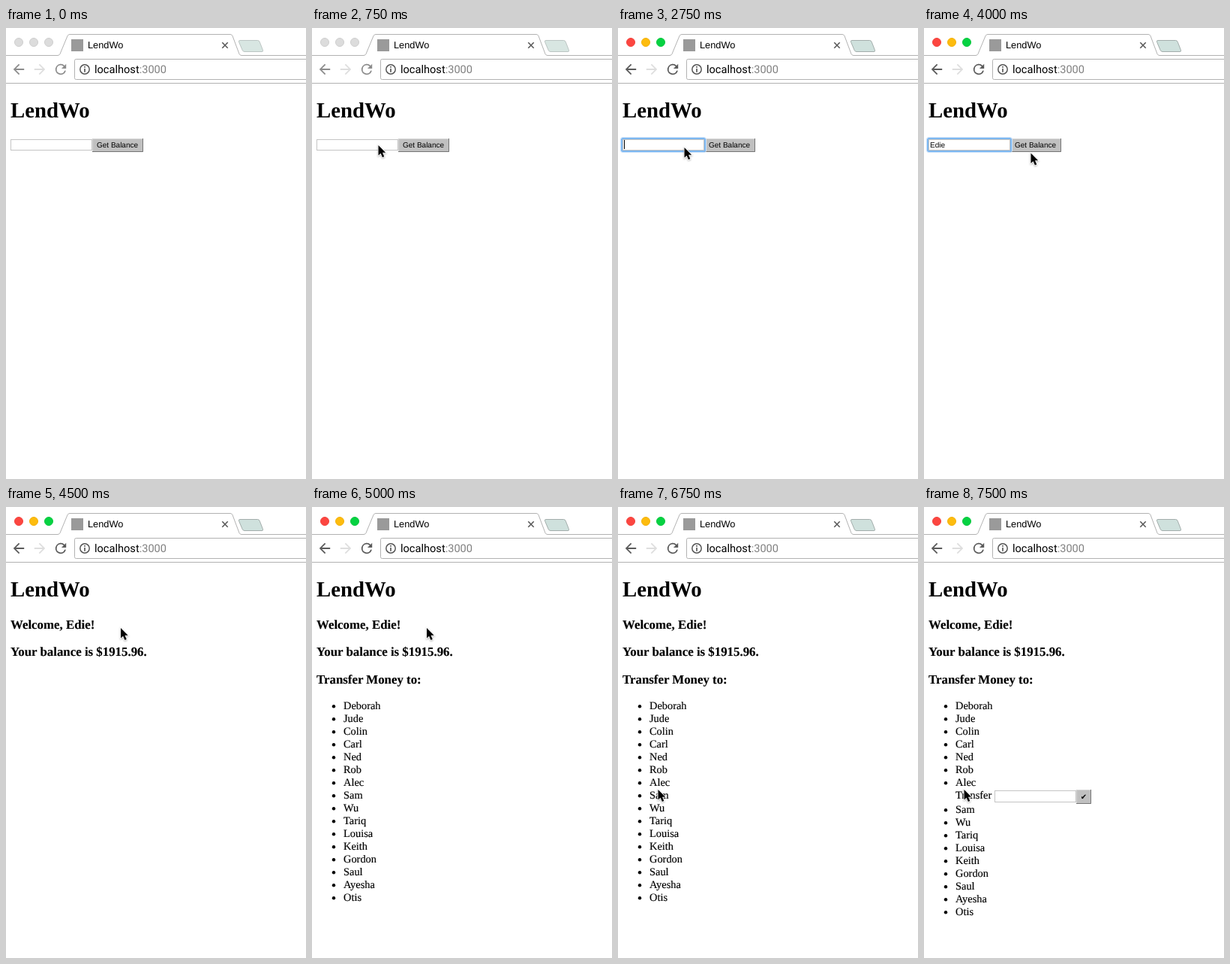
Write an HTML page that moves like this. It is 400 px wide and 600 px high and loops after 8 s.

```html
<!DOCTYPE html>
<html lang="en">
<head>
<meta charset="utf-8">
<title>LendWo</title>
<style>
  html, body { margin: 0; width: 100%; height: 100%; overflow: hidden; background: #fff; }
  svg { display: block; width: 400px; height: 600px; }
  text { white-space: pre; text-rendering: geometricPrecision; }
  .serif { font: 14.4px "Liberation Serif", serif; }
  .h1 { font: bold 28.8px "Liberation Serif", serif; }
  .h3 { font: bold 16.85px "Liberation Serif", serif; }
  .serif, .h3 { stroke: #000; stroke-width: .15px; }
  .control { font: 10px "Liberation Sans", sans-serif; }
  .tab { font: 12.8px "Liberation Sans", sans-serif; }
  .url { font: 14.6px Roboto, sans-serif; }
  .line { fill: none; stroke: #b2b2b2; }
  .icon { fill: #5a5a5a; }
  .close { fill: none; stroke: #5a5a5a; stroke-width: 1.6; }
  #newTab { fill: #cfe1dd; stroke: #a3adab; }
  .blurred .icon { fill: #8c8c8c; }
  .blurred .light { fill: #dcdcdc; stroke: #cecece; }
  .blurred #newTab { fill: #d8e6e2; stroke: #bcc5c3; }
</style>
</head>
<body>
<svg viewBox="0 0 400 600">
  <defs>
    <path id="arrow" transform="scale(.9)" d="M8 -1H-4.200L1.400 -6.600L0 -8L-8 0L0 8L1.400 6.600L-4.200 1H8Z"/>
    <path id="reload" transform="scale(.9)" d="M5.650 -5.650A8 8 0 1 0 7.730 2H5.650A6 6 0 1 1 0 -6C1.660 -6 3.140 -5.310 4.220 -4.220L1 -1H8V-8Z"/>
  </defs>
  <rect width="400" height="600" fill="#fff"/>

  <g id="chrome">
    <circle class="light" cx="17" cy="19" r="5.5" fill="#fc4640" stroke="#f2423d"/>
    <circle class="light" cx="37" cy="19" r="5.5" fill="#fdbc0e" stroke="#f4b10c"/>
    <circle class="light" cx="57" cy="19" r="5.5" fill="#06d242" stroke="#07c83e"/>
    <path class="line" d="M0 36.5H69Q71 36.5 72 34.5L82 10.5Q83 8.5 85 8.5H299Q301 8.5 302 10.5L311 34.5Q312 36.5 314 36.5H400"/>
    <path class="line" d="M0 73.5H400"/>
    <path class="line" d="M400 41.5H93.500Q91.500 41.5 91.500 43.5V66.500Q91.500 68.500 93.500 68.500H400"/>
    <path id="newTab" d="M312 16.500H335.500Q337.500 16.500 338.200 18.500L342.500 29.500Q343.300 31.500 341 31.500H318Q316 31.500 315.200 29.500L310.500 18.500Q309.800 16.500 312 16.500Z"/>
    <rect x="87" y="15" width="16" height="16" fill="#9a9a9a"/>
    <text class="tab" x="109" y="27">LendWo</text>
    <path class="close" d="M288.300 19.300L295.700 26.700M295.700 19.300L288.300 26.700"/>
    <use class="icon" href="#arrow" x="17" y="55"/>
    <use href="#arrow" transform="translate(45 55) scale(-1 1)" fill="#dedede"/>
    <use class="icon" href="#reload" x="73" y="55"/>
    <circle cx="105" cy="55" r="6.200" fill="none" stroke="#555" stroke-width="1.500"/>
    <path d="M105 51V52.700M105 54V58.700" stroke="#555" stroke-width="1.700"/>
    <text class="url" x="118" y="60">localhost<tspan fill="#808080">:3000</tspan></text>
  </g>

  <text class="h1" x="6" y="119">LendWo</text>

  <g id="login">
    <rect x="6.500" y="148.500" width="108" height="14" fill="#fff" stroke="#c4c4c4"/>
    <rect x="115" y="147" width="68" height="18" fill="#c0c0c0"/>
    <path d="M115.500 165V147.500H183" fill="none" stroke="#d6d6d6"/>
    <path d="M115 164.500H182.500V147" fill="none" stroke="#757575"/>
    <text class="control" x="121" y="159">Get Balance</text>
    <g id="ring" fill="none">
      <rect x="3.500" y="145.500" width="114" height="20" rx="2.500" stroke="#cfe4fa"/>
      <rect x="5" y="147" width="111" height="17" rx="1.500" stroke="#7db7f0" stroke-width="2"/>
    </g>
    <text class="control" id="entry" x="8" y="159"></text>
    <rect id="caret" y="149" width="1" height="12"/>
  </g>

  <g id="account" class="h3">
    <text x="6" y="162">Welcome, Edie!</text>
    <text x="6" y="198">Your balance is $1915.96.</text>
  </g>

  <g id="people">
    <text class="h3" x="6" y="235">Transfer Money to:</text>
  </g>

  <g id="transfer">
    <text class="serif" x="42" y="388">Transfer</text>
    <rect x="94.500" y="377.500" width="108" height="15" fill="#fff" stroke="#c4c4c4"/>
    <rect x="203" y="376" width="20" height="19" fill="#c0c0c0"/>
    <path d="M203.500 395V376.500H223" fill="none" stroke="#d6d6d6"/>
    <path d="M203 394.500H222.500V376" fill="none" stroke="#757575"/>
    <text x="213" y="389" text-anchor="middle" style="font: 10px 'DejaVu Sans', sans-serif">✔</text>
  </g>

  <path id="cursor" d="M0 0V13.500L3.100 10.700L5.400 16L7.800 15L5.500 9.800H9.700Z"
        stroke="#fff" stroke-width="1.600" paint-order="stroke"
        style="filter: drop-shadow(0 1px 1px rgba(0,0,0,.3))"/>
</svg>
<script>
const LOOP = 8000;
const NAMES = ["Deborah", "Jude", "Colin", "Carl", "Ned", "Rob", "Alec", "Sam", "Wu",
  "Tariq", "Louisa", "Keith", "Gordon", "Saul", "Ayesha", "Otis"];
const FORM_ROW = 7, ROW = 17, FORM_HEIGHT = 19;

// Each table: [start time, value], held until the next entry.
const CURSOR = [
  [0, null], [250, [174, 142]], [500, [112.5, 134]], [750, [88.5, 156]], [1000, [88.5, 159]],
  [4000, [142.5, 166.5]], [4250, [150.5, 161]], [4500, [153, 161]], [6000, [152, 169]],
  [6250, [89.5, 366.5]], [6500, [56.5, 376.5]], [6750, [53.5, 376]]
];
const CARET = [
  [0, null], [1750, 8], [2250, null], [2750, 8], [3000, 14], [3250, 19], [3500, 28], [4000, null]
];
const ENTRY = [[0, ""], [3000, "E"], [3250, "Ed"], [3500, "Edie"]];
const ACTIVE = 1250, FOCUS = 1750, ACCOUNT = 4500, LIST = 5000, FORM = 7250;

const $ = id => document.getElementById(id);
const at = (table, t) => table.filter(([start]) => start <= t).pop()[1];
const show = (id, on) => $(id).setAttribute("visibility", on ? "inherit" : "hidden");

function add(parent, tag, attrs) {
  const node = document.createElementNS("http://www.w3.org/2000/svg", tag);
  for (const key in attrs) node.setAttribute(key, attrs[key]);
  return parent.appendChild(node);
}

const rows = NAMES.map((name, i) => {
  const row = add($("people"), "g", {});
  const y = 269 + i * ROW;
  add(row, "circle", { cx: 29, cy: y - 3.8, r: 2.2 });
  add(row, "text", { class: "serif", x: 42, y }).textContent = name;
  return row;
});

function draw(t) {
  const tip = at(CURSOR, t), caret = at(CARET, t);
  $("chrome").classList.toggle("blurred", t < ACTIVE);
  show("login", t < ACCOUNT);
  show("ring", t >= FOCUS && t < ACCOUNT);
  show("caret", caret !== null);
  if (caret !== null) $("caret").setAttribute("x", caret);
  $("entry").textContent = at(ENTRY, t);
  show("account", t >= ACCOUNT);
  show("people", t >= LIST);
  show("transfer", t >= FORM);
  const shift = t >= FORM ? FORM_HEIGHT : 0;
  rows.slice(FORM_ROW).forEach(row => row.setAttribute("transform", `translate(0 ${shift})`));
  show("cursor", tip);
  if (tip) $("cursor").setAttribute("transform", `translate(${tip})`);
}

const begin = performance.now();
function tick() {
  draw((performance.now() - begin) % LOOP);
  requestAnimationFrame(tick);
}
tick();
</script>
</body>
</html>
```
